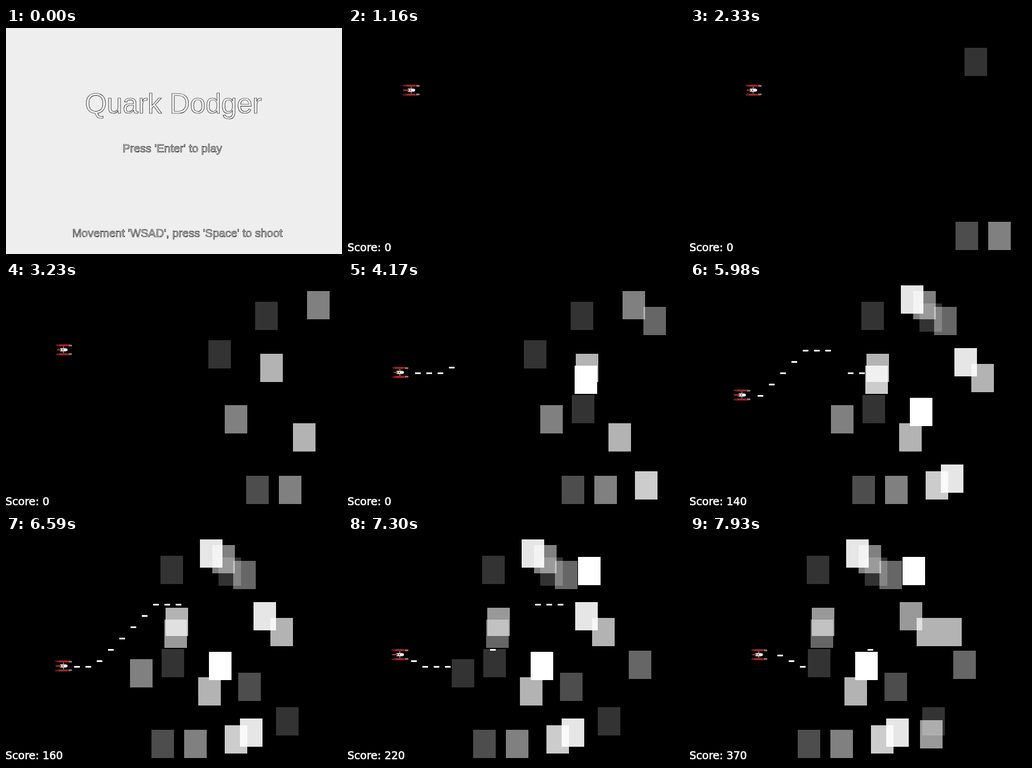
Recreate the animation shown at these times as an HTML page with a canvas. Size 596 by 400 pixels, loop 8 s.

```html
<!DOCTYPE html>
<html lang="en">
<head>
<meta charset="utf-8">
<title>Quark Dodger</title>
<style>
  html, body { margin: 0; width: 100%; height: 100%; overflow: hidden; background: #000; }
  canvas { display: block; }
</style>
</head>
<body>
<canvas id="stage" width="596" height="400"></canvas>
<script>
const ctx = document.getElementById('stage').getContext('2d');
const LOOP = 8000, GAME_START = 1160;
const BLOCK_SPEED = 0.05, SHOT_SPEED = 0.1;
const BLOCK_W = 40, BLOCK_H = 50, SHOT_W = 10, SHIP_W = 30;
const FIRST_BLOCK = 2020, FIRST_SHOT = 3450, SHOT_GAP = 200, MUZZLE = 107;

// Key points of the flight: time, x, y
const flight = [
  [2750, 97, 110], [2850, 87, 120], [3230, 87, 120], [3550, 77, 160],
  [4250, 77, 160], [4650, 67, 120], [5090, 77, 120], [6190, 77, 230],
  [6500, 87, 230], [7000, 67, 230], [7450, 77, 210], [7800, 107, 210]
];

// x at time zero, y, strength in tenths; in order of birth, ever further apart
const blocks = [
  [588, 343, 3], [646, 343, 5], [604, 35, 2], [521, 103, 2], [671, 250, 7], [613, 127, 7],
  [550, 218, 5], [696, 16, 5], [611, 148, 10], [606, 200, 2], [718, 335, 8], [733, 44, 4],
  [674, 6, 9], [690, 205, 10], [745, 323, 9], [799, 145, 7], [707, 38, 2], [769, 117, 9],
  [809, 303, 2], [742, 242, 3], [774, 37, 10], [864, 203, 4], [839, 145, 7], [805, 326, 6]
].map(([x, y, power], n) => ({ x, y, power, born: FIRST_BLOCK + n * (137 + 5 * n), hits: [] }));

// Upper half of the ship, outwards from its axis: colour, x, y, width, height
const shipHalf = [
  ['#6b1717', 3, 6, 24, 4], ['#b02a2a', 7, 7, 15, 2], ['#8a7470', 24, 6, 6, 3],
  ['#777', 14, 2, 2, 4], ['#aaa', 9, 1, 11, 2], ['#eee', 11, 0, 11, 2], ['#444', 13, 0, 2, 1]
];

function shipAt(t) {
  const next = flight.findIndex(key => key[0] > t);
  if (next < 1) return flight.at(next).slice(1);
  const [t0, x0, y0] = flight[next - 1], [t1, x1, y1] = flight[next];
  const p = (t - t0) / (t1 - t0);
  return [x0 + (x1 - x0) * p, y0 + (y1 - y0) * p];
}

// A shot ends at the first living block in its row and weakens it.
function fire(start) {
  const y = Math.round(shipAt(start)[1] / 10) * 10;
  const shot = { x: MUZZLE - SHOT_SPEED * start, y, end: Infinity };
  const meeting = b => (b.x - shot.x - SHOT_W) / (BLOCK_SPEED + SHOT_SPEED);
  const target = blocks
    .filter(b => y > b.y && y < b.y + BLOCK_H && b.hits.length < b.power
      && meeting(b) > Math.max(start, b.born))
    .sort((a, b) => a.x - b.x)[0];
  if (target) {
    shot.end = meeting(target);
    target.hits.push(shot.end);
  }
  return shot;
}

const shots = [];
for (let t = FIRST_SHOT; t < LOOP; t += SHOT_GAP) shots.push(fire(t));

function rect(color, x, y, w, h) {
  ctx.fillStyle = color;
  ctx.fillRect(x, y, w, h);
}

function outline(text, size, x, y) {
  ctx.font = `${size}px "Liberation Sans", Arial, sans-serif`;
  ctx.textAlign = 'center';
  ctx.strokeStyle = '#000';
  ctx.lineWidth = 0.65;
  ctx.strokeText(text, x, y);
}

function drawTitle() {
  rect('#eee', 0, 0, 596, 400);
  outline('Quark Dodger', 50, 297, 151);
  outline("Press 'Enter' to play", 20, 295, 220);
  outline("Movement 'WSAD', press 'Space' to shoot", 20, 304, 370);
}

function drawShip(x, y, t) {
  const flare = (t - GAME_START) % 235 > 150;
  for (const side of [-1, 1]) {
    ctx.save();
    ctx.translate(x, y);
    ctx.scale(1, side);
    rect('#c8372a', flare ? 4 : 1, 0, 9, 1);
    rect('#c44', flare ? 2 : 0, 8, 4, 1);
    for (const part of shipHalf) rect(...part);
    ctx.restore();
  }
}

function drawScore(score) {
  const text = 'Score: ' + score;
  ctx.font = '19px "DejaVu Sans", sans-serif';
  ctx.textAlign = 'left';
  ctx.fillStyle = ctx.strokeStyle = '#fff';
  ctx.lineWidth = 0.7;
  ctx.fillText(text, -1, 395);
  ctx.strokeText(text, -1, 395);
}

function drawGame(t) {
  rect('#000', 0, 0, 596, 400);
  const [px, py] = shipAt(t);
  const x = Math.round((px - 7) / 10) * 10 + 7;
  const y = Math.floor(py / 10) * 10;
  let score = 0;

  for (const b of blocks) {
    const hits = b.hits.filter(h => h <= t).length;
    const left = b.power - hits;
    score += hits * 10 + (left ? 0 : 100);
    if (t < b.born || !left) continue;
    rect(`rgba(255,255,255,${left / 10})`, Math.floor(b.x - BLOCK_SPEED * t), b.y, BLOCK_W, BLOCK_H);
  }
  for (const s of shots) {
    const sx = Math.round(s.x + SHOT_SPEED * t);
    if (sx >= x + SHIP_W && t < s.end) rect('#fff', sx, s.y, SHOT_W, 3);
  }
  drawShip(x, y, t);
  drawScore(score);
}

function frame() {
  const t = performance.now() % LOOP;
  if (t < GAME_START) drawTitle();
  else drawGame(t);
  requestAnimationFrame(frame);
}
frame();
</script>
</body>
</html>
```
